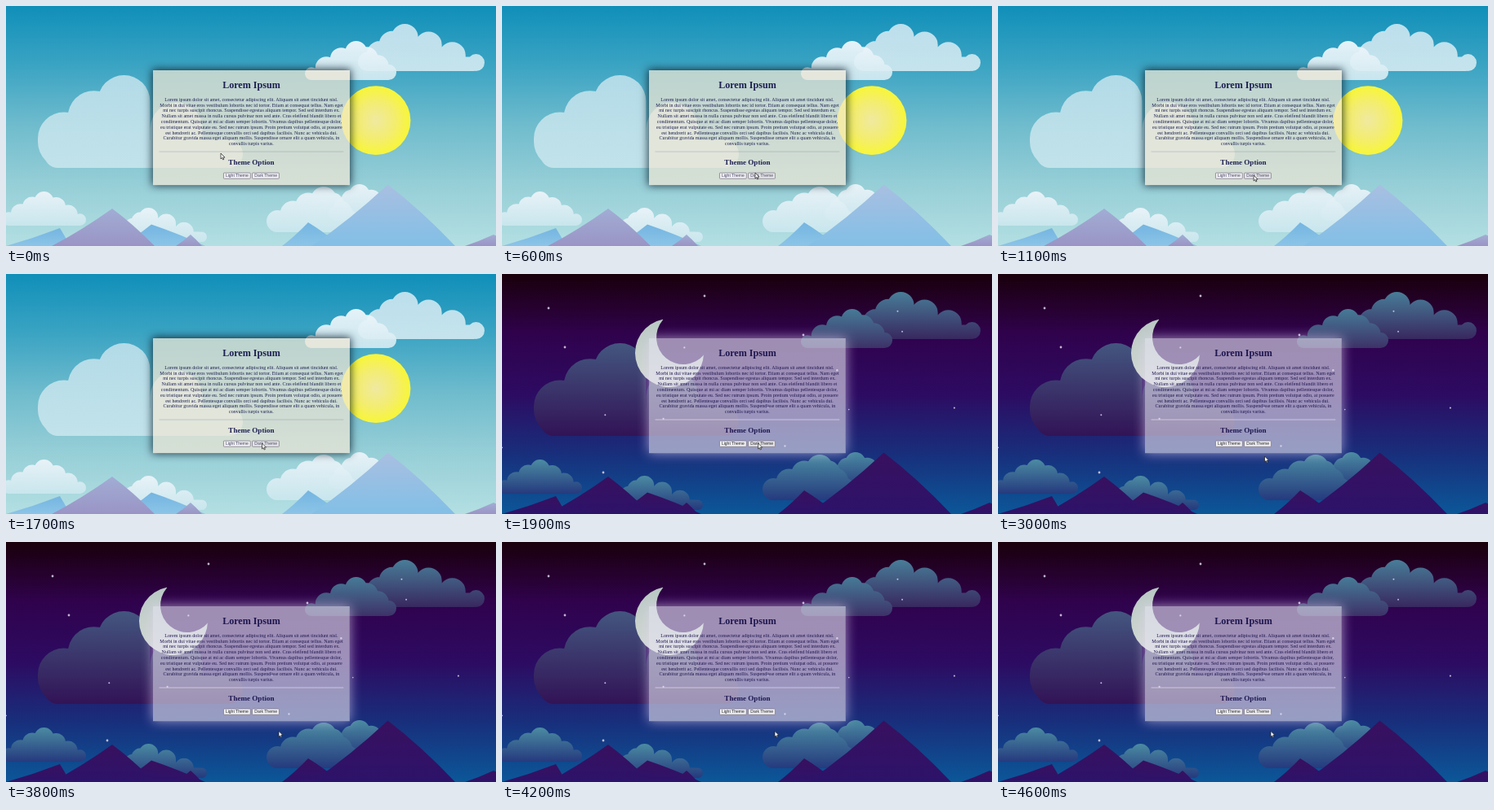
Recreate the animation shown at these times as an HTML page with a canvas. Size 600x295 px, loop 4700 ms.

```html
<!DOCTYPE html>
<html lang="en">
<head>
<meta charset="utf-8">
<title>Theme option</title>
<style>
html, body { margin: 0; width: 100%; height: 100%; overflow: hidden; }
body { position: relative; background: #1090ba; }
body.dark { background: #1a000c; }
canvas, svg { position: absolute; left: 0; top: 0; width: 600px; height: 295px; }
.card {
  position: absolute; left: 180px; top: 79px;
  box-sizing: border-box; width: 638px; height: 374px; padding: 6.5px 20px 0;
  transform: scale(.3775); transform-origin: 0 0;
  font: 16px/18px "Liberation Serif", "Times New Roman", serif;
  color: #1d2052; text-align: center; white-space: nowrap;
  background: rgba(241, 231, 213, .7);
  box-shadow: 0 0 26px 3px rgba(10, 30, 45, .85);
}
.dark .card {
  color: #1e174f;
  background: rgba(228, 226, 240, .62);
  box-shadow: 0 0 36px 3px rgba(225, 215, 245, .62);
}
h1 { font-size: 32px; line-height: 37px; margin: 21.4px 0; }
h2 { font-size: 24px; line-height: 27px; margin: 20px 0; }
p { margin: 0 0 16px; }
hr { height: 2px; margin: 0; border: 0; background: rgba(125, 150, 160, .5); }
.dark hr { background: rgba(235, 228, 242, .8); }
button {
  box-sizing: border-box; height: 21px; padding: 0 6px; margin: 0;
  font: 13.333px/17px "Liberation Sans", Arial, sans-serif;
  color: #46426a; background: #efefef; border: 2px solid #7d7788; border-radius: 3px;
}
.dark button { color: #22202c; }
button.hover { background: #e5e5e5; }
</style>
</head>
<body>
<canvas id="scene" width="600" height="295"></canvas>
<div class="card">
  <h1>Lorem Ipsum</h1>
  <p>Lorem ipsum dolor sit amet, consectetur adipiscing elit. Aliquam sit amet tincidunt nisl.<br>
  Morbi in dui vitae eros vestibulum lobortis nec id tortor. Etiam at consequat tellus. Nam eget<br>
  mi nec turpis suscipit rhoncus. Suspendisse egestas aliquam tempor. Sed sed interdum ex.<br>
  Nullam sit amet massa in nulla cursus pulvinar non sed ante. Cras eleifend blandit libero et<br>
  condimentum. Quisque at mi ac diam semper lobortis. Vivamus dapibus pellentesque dolor,<br>
  eu tristique erat vulputate eu. Sed nec rutrum ipsum. Proin pretium volutpat odio, at posuere<br>
  est hendrerit ac. Pellentesque convallis orci sed dapibus facilisis. Nunc ac vehicula dui.<br>
  Curabitur gravida massa eget aliquam mollis. Suspendisse ornare elit a quam vehicula, in<br>
  convallis turpis varius.</p>
  <hr>
  <h2>Theme Option</h2>
  <button>Light Theme</button> <button id="darkBtn">Dark Theme</button>
</div>
<svg viewBox="0 0 600 295">
  <path id="cursor" d="M0 0V7L1.6 5.5L2.7 8L3.8 7.5L2.8 5.1H5Z"
    fill="#fff" stroke="#181818" stroke-width=".7"/>
</svg>
<script>
const ctx = document.getElementById('scene').getContext('2d');
const cursor = document.getElementById('cursor');
const darkBtn = document.getElementById('darkBtn');
const W = 600, H = 295, LOOP = 4700, STEP = 100, SWITCH = 1800;

const light = {
  sky: ['#108fb9', '#3ba4c3', '#70bccd', '#97cfd7', '#b3dfe2'],
  big: ['rgba(215,236,243,.75)', 'rgba(215,236,243,.72)'],
  high: ['rgba(216,236,244,.85)', 'rgba(220,238,244,.85)'],
  front: ['rgba(239,247,251,.95)', 'rgba(212,234,241,.92)'],
  low: ['rgba(236,244,249,.95)', 'rgba(203,231,238,.92)'],
  blue: ['#74b5e1', '#8cc4e7'],
  lilac: ['#a1add4', '#9a94c5'],
  tall: ['#a8bfe1', '#82bfe6']
};
const purple = ['#39105f', '#2c136a'];
const dark = {
  sky: ['#19000a', '#30024d', '#2d0b62', '#182f7c', '#0b5798'],
  big: ['#43567f', '#321356'],
  high: ['#487d98', '#38285f'],
  front: ['#467b97', '#3d3268'],
  low: ['#4b8ba2', '#253a7e'],
  blue: purple, lilac: purple, tall: purple
};

function ramp(y0, y1, colors) {
  const g = ctx.createLinearGradient(0, y0, 0, y1);
  colors.forEach((c, i) => g.addColorStop(i / (colors.length - 1), c));
  return g;
}

// Round-topped columns step down from the crest to both ends of the box.
// crest: 0..1 across; dropL, dropR: how far the end lobes sit below the top.
function cloud(colors, x, y, w, h, crest, dropL, dropR, lobes = 3) {
  const mid = x + w * crest;
  const lobe = (end, drop, k) => {
    const r0 = h * Math.min(.28, (1 - drop) / 2);
    const edge = end < mid ? end + r0 : end - r0;
    const fall = drop * k ** 1.25;
    const r = h * Math.min(.28, (1 - fall) / 2);
    ctx.roundRect(mid + (edge - mid) * k - r, y + h * fall, r * 2, h * (1 - fall), r);
  };
  ctx.beginPath();
  for (let i = 0; i <= lobes; i++) {
    lobe(x, dropL, i / lobes);
    lobe(x + w, dropR, i / lobes);
  }
  ctx.roundRect(x + w * .03, y + h * .7, w * .94, h * .3, h * .15);
  ctx.fillStyle = ramp(y, y + h, colors);
  ctx.fill();
}

// Two slightly hollow slopes meeting at a summit.
function peak(colors, x, y, left, right) {
  const sag = (H - y) * .08;
  ctx.beginPath();
  ctx.moveTo(left, H);
  ctx.quadraticCurveTo((left + x) / 2, (H + y) / 2 + sag, x, y);
  ctx.quadraticCurveTo((right + x) / 2, (H + y) / 2 - sag, right, H);
  ctx.fillStyle = ramp(y, H, colors);
  ctx.fill();
}

function disc(x, y, r, fill) {
  ctx.beginPath();
  ctx.arc(x, y, r, 0, Math.PI * 2);
  ctx.fillStyle = fill;
  ctx.fill();
}

function sun() {
  const x = 453, y = 140.7, r = 42.4;
  const g = ctx.createRadialGradient(x, y, 0, x, y, r);
  g.addColorStop(0, '#f0e9a0');
  g.addColorStop(.55, '#f3ed70');
  g.addColorStop(1, '#f8f638');
  disc(x, y, r, g);
}

function moon() {
  const outer = [205, 97, 42], inner = [222, 78, 33];
  const tips = [[197, 56], [247, 99]];
  const angle = (c, p) => Math.atan2(p[1] - c[1], p[0] - c[0]);
  ctx.beginPath();
  ctx.arc(...outer, angle(outer, tips[0]), angle(outer, tips[1]), true);
  ctx.arc(...inner, angle(inner, tips[1]), angle(inner, tips[0]));
  ctx.fillStyle = ramp(56, 139, ['#b9c8c4', '#d6dad5']);
  ctx.fill();
}

function stars() {
  const tint = 'rgba(222,212,236,.85)';
  for (const [x, y] of [[57, 42], [248, 27], [369, 75], [124, 244], [77, 90]]) disc(x, y, 1.4, tint);
  let seed = 7;
  const rnd = () => (seed = seed * 16807 % 2147483647) / 2147483647;
  for (let i = 0; i < 11; i++) disc(rnd() * W, 20 + rnd() * 210, .8 + rnd() * .4, tint);
}

function paint(isDark) {
  const c = isDark ? dark : light;
  ctx.fillStyle = ramp(0, H, c.sky);
  ctx.fillRect(0, 0, W, H);

  cloud(c.big, 39, 85, 251, 114, .42, .4, .7, 2);
  cloud(c.high, 431, 22, 155, 58, .37, .6, .64);
  cloud(c.front, 366, 43, 112, 48, .56, .67, .6);
  cloud(c.low, -5, 228, 103, 42, .5, .6, .65);
  cloud(c.low, 136, 248, 110, 42, .35, .5, .7);
  cloud(c.low, 395, 219, 90, 45, .42, .6, .6);
  cloud(c.low, 319, 222, 113, 56, .62, .52, .5);

  if (isDark) {
    moon();
    stars();
  } else sun();

  peak(c.blue, 66, 273, 0, 78);
  peak(c.blue, 178, 268.5, 140, 244);
  peak(c.lilac, 226, 281, 208, 240);
  peak(c.lilac, 130, 249, 56, 182);
  peak(c.blue, 370, 266, 338, 410);
  peak(c.lilac, 597, 281, 562, 625);
  peak(c.tall, 467.5, 219.5, 374, 550);
}

// time and tip position of the pointer
const track = [
  [0, 263, 181], [600, 310, 205], [900, 313, 208], [2400, 314, 208],
  [3000, 326.5, 224], [3400, 334, 232.5], [LOOP, 334, 232.5]
];

function pointer(t) {
  const i = track.findIndex(k => k[0] > t);
  const [t0, x0, y0] = track[i - 1], [t1, x1, y1] = track[i];
  const k = (t - t0) / (t1 - t0);
  return [x0 + (x1 - x0) * k, y0 + (y1 - y0) * k];
}

let shown = null;
const start = performance.now();
function frame(now) {
  const t = Math.floor((Math.max(0, now - start) % LOOP) / STEP) * STEP;
  const isDark = t >= SWITCH;
  if (isDark !== shown) {
    shown = isDark;
    document.body.classList.toggle('dark', isDark);
    paint(isDark);
  }
  const [x, y] = pointer(t);
  cursor.setAttribute('transform', `translate(${x} ${y})`);
  darkBtn.classList.toggle('hover', x > 301 && x < 335 && y > 204 && y < 213);
  requestAnimationFrame(frame);
}
frame(start);
</script>
</body>
</html>
```
